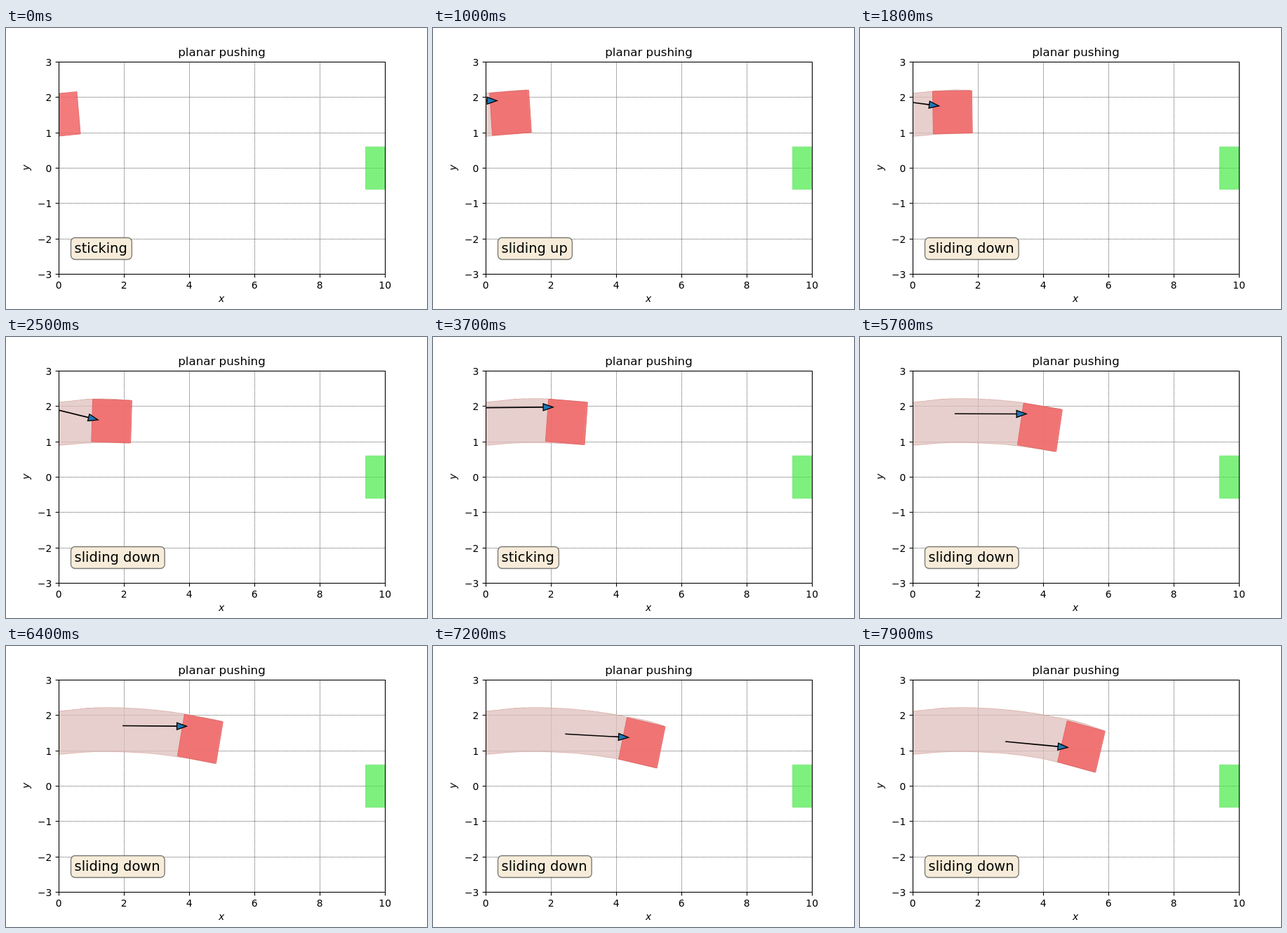
Recreate the animation shown at these times as an HTML page. Size 600x400 px, loop 8 s.

```html
<!DOCTYPE html>
<html lang="en">
<head>
<meta charset="utf-8">
<title>Planar pushing</title>
<style>
  html, body { margin: 0; width: 100%; height: 100%; overflow: hidden; background: #fff; }
  svg { display: block; width: 600px; height: 400px; font-family: "DejaVu Sans", sans-serif; }
</style>
</head>
<body>
<svg id="stage" viewBox="0 0 600 400">
  <defs><clipPath id="area"><rect x="75" y="48" width="466" height="303"/></clipPath></defs>
  <g clip-path="url(#area)">
    <g id="grid" stroke="#000" stroke-opacity=".5" stroke-width="1" stroke-dasharray="1.4 .8"/>
    <g opacity=".75">
      <path id="trailEdge" fill="none" stroke="#d09690" stroke-width="1.5"/>
      <path id="trail" fill="#debfbb"/>
    </g>
    <path id="goal" fill="#48ea48" stroke="#48e048" opacity=".7"/>
    <path id="box" fill="#f26565" stroke="#e25656" opacity=".85"/>
    <path id="shaft" stroke="#000" stroke-width="1.6"/>
    <path id="head" fill="#1f77b4" stroke="#000" stroke-width="1.3"/>
  </g>
  <rect x="75.5" y="48.5" width="465" height="302" fill="none" stroke="#000" stroke-width="1.1"/>
  <g id="ticks" stroke="#000" stroke-width="1.1"/>
  <g id="labels" font-size="13.89"/>
  <text x="307.5" y="40" font-size="16.67" text-anchor="middle">planar pushing</text>
  <g font-size="13.89" font-style="italic" text-anchor="middle">
    <text x="307.2" y="390">x</text>
    <text transform="translate(33 198.7) rotate(-90)">y</text>
  </g>
  <rect id="modeBox" x="92.5" y="298.5" height="31" rx="5.8" fill="#f6ecd9"
        stroke="#000" stroke-opacity=".5" stroke-width="1.39"/>
  <text id="mode" x="97.6" y="320" font-size="19.44"></text>
</svg>
<script>
const STEP = 100, STEPS = 80, HALF = 0.6;
const $ = id => document.getElementById(id);
const px = x => 75.5 + 46.5 * x;
const py = y => 199.4 - 50.33 * y;

// step, x, y, angle of the box
const poses = [
  [0, 0.005, 1.507, 0.092], [10, 0.753, 1.565, 0.07], [25, 1.615, 1.584, -0.032],
  [37, 2.47, 1.562, -0.077], [49, 3.355, 1.478, -0.134], [64, 4.33, 1.334, -0.179],
  [79, 5.16, 1.118, -0.25]
];
// step, tip height against the box centre, tail offset from the tip
const pushes = [
  [0, -14, -114, 0], [10, -17.2, -114, 0], [25, -1.7, -110, -27], [37, -21, -114, 1],
  [49, -20.2, -114.5, 0.2], [64, -18, -91.5, -0.7], [79, 1.3, -89, -8.5]
];
const modes = [
  [0, 'sticking'], [5, 'sliding up'], [15, 'sliding down'], [27, 'sliding up'],
  [36, 'sticking'], [57, 'sliding down']
];

function segment(keys, t) {
  let i = 0;
  while (i < keys.length - 2 && t >= keys[i + 1][0]) i++;
  return i;
}

function slope(keys, i, c) {
  const a = keys[Math.max(0, i - 1)], b = keys[Math.min(keys.length - 1, i + 1)];
  return (b[c] - a[c]) / (b[0] - a[0]);
}

function smooth(keys, t) {
  const i = segment(keys, t), a = keys[i], b = keys[i + 1];
  const d = b[0] - a[0], u = (t - a[0]) / d, v = 1 - u;
  return [1, 2, 3].map(c =>
    a[c] * v * v * (1 + 2 * u) + b[c] * u * u * (3 - 2 * u) +
    d * u * v * (v * slope(keys, i, c) - u * slope(keys, i + 1, c)));
}

function linear(keys, t) {
  const i = segment(keys, t), a = keys[i], b = keys[i + 1];
  const u = (t - a[0]) / (b[0] - a[0]);
  return [1, 2, 3].map(c => a[c] + (b[c] - a[c]) * u);
}

function square([x, y, angle]) {
  const c = HALF * Math.cos(angle), s = HALF * Math.sin(angle);
  const corners = [[-1, -1], [1, -1], [1, 1], [-1, 1]].map(([i, j]) =>
    px(x + i * c - j * s).toFixed(2) + ' ' + py(y + i * s + j * c).toFixed(2));
  return 'M' + corners.join('L') + 'Z';
}

function add(parent, name, attrs, text = '') {
  const el = document.createElementNS('http://www.w3.org/2000/svg', name);
  for (const key in attrs) el.setAttribute(key, attrs[key]);
  el.textContent = text;
  $(parent).append(el);
}

function drawAxes() {
  for (let x = 0; x <= 10; x += 2) {
    const p = Math.floor(px(x)) + 0.5;
    if (x > 0 && x < 10) add('grid', 'path', { d: `M${p} 350V48` });
    add('ticks', 'path', { d: `M${p} 350.5v4.9` });
    add('labels', 'text', { x: p - 0.3, y: 371, 'text-anchor': 'middle' }, x);
  }
  for (let y = -3; y <= 3; y++) {
    const p = Math.floor(py(y)) + 0.5;
    if (Math.abs(y) < 3) add('grid', 'path', { d: `M75 ${p}H540` });
    add('ticks', 'path', { d: `M75.5 ${p}h-4.9` });
    add('labels', 'text', { x: 65.4, y: p + 5, 'text-anchor': 'end' }, String(y).replace('-', '\u2212'));
  }
  $('goal').setAttribute('d', square([10, 0, 0]));
}

const squares = Array.from({ length: STEPS }, (_, t) => square(smooth(poses, t)));

function drawArrow(t) {
  const [x, y] = smooth(poses, t), [rise, dx, dy] = linear(pushes, t);
  const tipX = px(x) - 19.3, tipY = py(y) + rise;
  const len = Math.hypot(dx, dy), ux = -dx / len, uy = -dy / len;
  const baseX = tipX - 14 * ux, baseY = tipY - 14 * uy;
  $('shaft').setAttribute('d', `M${tipX + dx} ${tipY + dy}L${baseX} ${baseY}`);
  $('head').setAttribute('d', `M${tipX} ${tipY}L${baseX - 5 * uy} ${baseY + 5 * ux}` +
    `L${baseX + 5 * uy} ${baseY - 5 * ux}Z`);
}

function draw(t) {
  const past = squares.slice(0, t).join('');
  $('trail').setAttribute('d', past);
  $('trailEdge').setAttribute('d', past);
  $('box').setAttribute('d', squares[t]);
  drawArrow(t);
  $('mode').textContent = modes.filter(m => m[0] <= t).pop()[1];
  $('modeBox').setAttribute('width', $('mode').getComputedTextLength() + 11.7);
}

drawAxes();
draw(0);
let start, shown = 0;
function tick(now) {
  start ??= now;
  const t = Math.floor((now - start) / STEP) % STEPS;
  if (t !== shown) draw(shown = t);
  requestAnimationFrame(tick);
}
requestAnimationFrame(tick);
</script>
</body>
</html>
```
